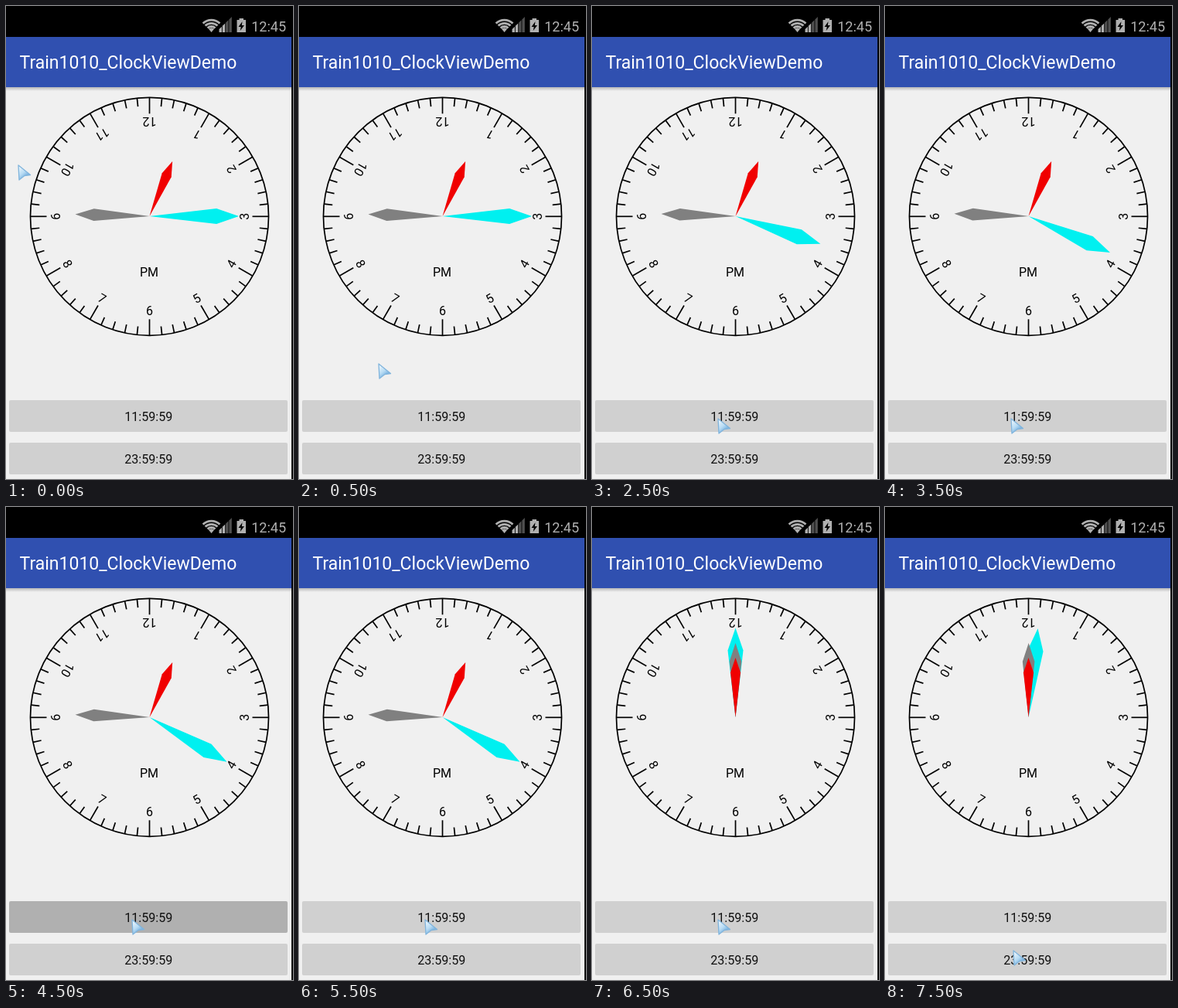
Write an HTML page with a canvas that moves like this. It is 371 px wide and 612 px high and loops after 8000 ms.

```html
<!DOCTYPE html>
<html lang="en">
<head>
<meta charset="utf-8">
<title>Clock view</title>
<style>
  html, body { margin: 0; width: 100%; height: 100%; overflow: hidden; background: #000; }
  canvas { display: block; }
</style>
</head>
<body>
<canvas id="stage" width="371" height="612"></canvas>
<script>
const ctx = document.getElementById('stage').getContext('2d');
const LOOP = 8000, TAU = Math.PI * 2;
const CX = 185.5, CY = 272.3, R = 154;
const hms = (h, m, s) => h * 3600 + m * 60 + s;

// A step holds its values until the next one begins.
const clockSteps = [
  [0, hms(12, 45, 15)], [1000, hms(12, 45, 16)], [2000, hms(12, 45, 17)],
  [2500, hms(12, 45, 18)], [3500, hms(12, 45, 19)], [4500, hms(12, 45, 20)],
  [6000, hms(11, 59, 59)], [6500, hms(12, 0, 0)], [7500, hms(12, 0, 1)]
];
const cursorSteps = [
  [0, 15, 205], [500, 102, 462], [1000, 84, 245],
  [1500, 119, 383], [2000, 162, 533], [7500, 165, 573]
];
const stepAt = (steps, t) => steps.filter(s => s[0] <= t).pop();

function text(str, x, y, size, color, align = 'center') {
  ctx.font = `${size}px Roboto, sans-serif`;
  ctx.textAlign = align;
  ctx.fillStyle = color;
  ctx.fillText(str, x, y);
}

function poly(points, fill) {
  ctx.beginPath();
  points.forEach(([x, y]) => ctx.lineTo(x, y));
  ctx.closePath();
  ctx.fillStyle = fill;
  ctx.fill();
}

function rect(x, y, w, h, fill) {
  ctx.fillStyle = fill;
  ctx.fillRect(x, y, w, h);
}

function at(x, y, angle, draw) {
  ctx.save();
  ctx.translate(x, y);
  ctx.rotate(angle);
  draw();
  ctx.restore();
}

function statusBar() {
  const on = '#b0b0b0', off = '#505050';
  rect(0, 0, 371, 40, '#000');

  // Wi-Fi fan
  ctx.strokeStyle = on;
  ctx.lineWidth = 2.8;
  for (const r of [7, 11.2, 15.4]) {
    ctx.beginPath();
    ctx.arc(265.5, 33.5, r, -Math.PI * 0.75, -Math.PI * 0.25);
    ctx.stroke();
  }
  poly([[265.5, 34], [261.8, 29.6], [265.5, 28.2], [269.2, 29.6]], on);

  // Signal bars
  for (let i = 0; i < 4; i++) {
    const x = 275.5 + i * 4.3, top = 30 - i * 4.2;
    poly([[x, 34], [x, top], [x + 3.4, top - 3.3], [x + 3.4, 34]], i < 2 ? on : off);
  }

  // Charging battery
  rect(301.5, 16, 5.5, 3, on);
  rect(298.5, 18, 11.5, 16, on);
  poly([[305.5, 20], [300.5, 27], [303.7, 27], [302.7, 32], [308, 25], [304.8, 25]], '#000');

  text('12:45', 362, 33, 18, on, 'right');
}

function toolbar() {
  rect(0, 40, 369, 65, '#3050b0');
  const shade = ctx.createLinearGradient(0, 105, 0, 110);
  shade.addColorStop(0, '#b8b8b8');
  shade.addColorStop(1, '#f0f0f0');
  rect(0, 105, 369, 5, shade);
  text('Train1010_ClockViewDemo', 17.5, 81, 23, '#fff', 'left');
}

function dial() {
  ctx.strokeStyle = '#000';
  ctx.lineWidth = 1.7;
  ctx.beginPath();
  ctx.arc(CX, CY, R, 0, TAU);
  ctx.stroke();
  for (let i = 1; i <= 60; i++) {
    at(CX, CY, i / 60 * TAU + Math.PI, () => {
      const major = i % 5 === 0;
      ctx.beginPath();
      ctx.moveTo(0, R);
      ctx.lineTo(0, major ? 133 : 143);
      ctx.stroke();
      if (major) text(i / 5, 0, 128, 16, '#000');
    });
  }
}

function hand(turns, length, half, color) {
  at(CX, CY - 0.3, turns * TAU, () => {
    const y = -length * 0.75;
    poly([[0, 0], [-half, y], [0, -length], [half, y]], color);
  });
}

function button(label, y, fill) {
  ctx.fillStyle = fill;
  ctx.beginPath();
  ctx.roundRect(4, y, 360, 41, 2);
  ctx.fill();
  text(label, 184.3, y + 26.5, 16.1, '#101010');
}

function cursor(x, y) {
  at(x, y, 0, () => {
    const shape = [[1, 1], [16.5, 13.5], [9, 14.5], [2, 20]];
    const fill = ctx.createLinearGradient(2, 4, 13, 17);
    fill.addColorStop(0, '#e8f4fc');
    fill.addColorStop(0.5, '#b8dcf4');
    fill.addColorStop(1, '#60a0d8');
    poly(shape, fill);
    ctx.strokeStyle = '#80b4dc';
    ctx.lineWidth = 1.3;
    ctx.lineJoin = 'round';
    ctx.stroke();
  });
}

function draw(t) {
  const [, time] = stepAt(clockSteps, t);
  const [, x, y] = stepAt(cursorSteps, t);
  const pressed = t >= 4500 && t < 5500;

  rect(0, 0, 371, 612, '#000');
  rect(0, 40, 369, 572, '#f0f0f0');
  statusBar();
  toolbar();
  dial();
  text(time < hms(12, 0, 0) ? 'AM' : 'PM', 185, 349.5, 16, '#000');
  hand(time / 60 % 1, 115.5, 10, '#00f0f0');
  hand(time / 3600 % 1, 96, 7.8, '#808080');
  hand(time / 43200 % 1, 77, 6.5, '#f00000');
  button('11:59:59', 510, pressed ? '#b0b0b0' : '#d0d0d0');
  button('23:59:59', 565, '#d0d0d0');
  cursor(x, y);
}

function loop() {
  draw(performance.now() % LOOP);
  requestAnimationFrame(loop);
}
loop();
</script>
</body>
</html>
```
